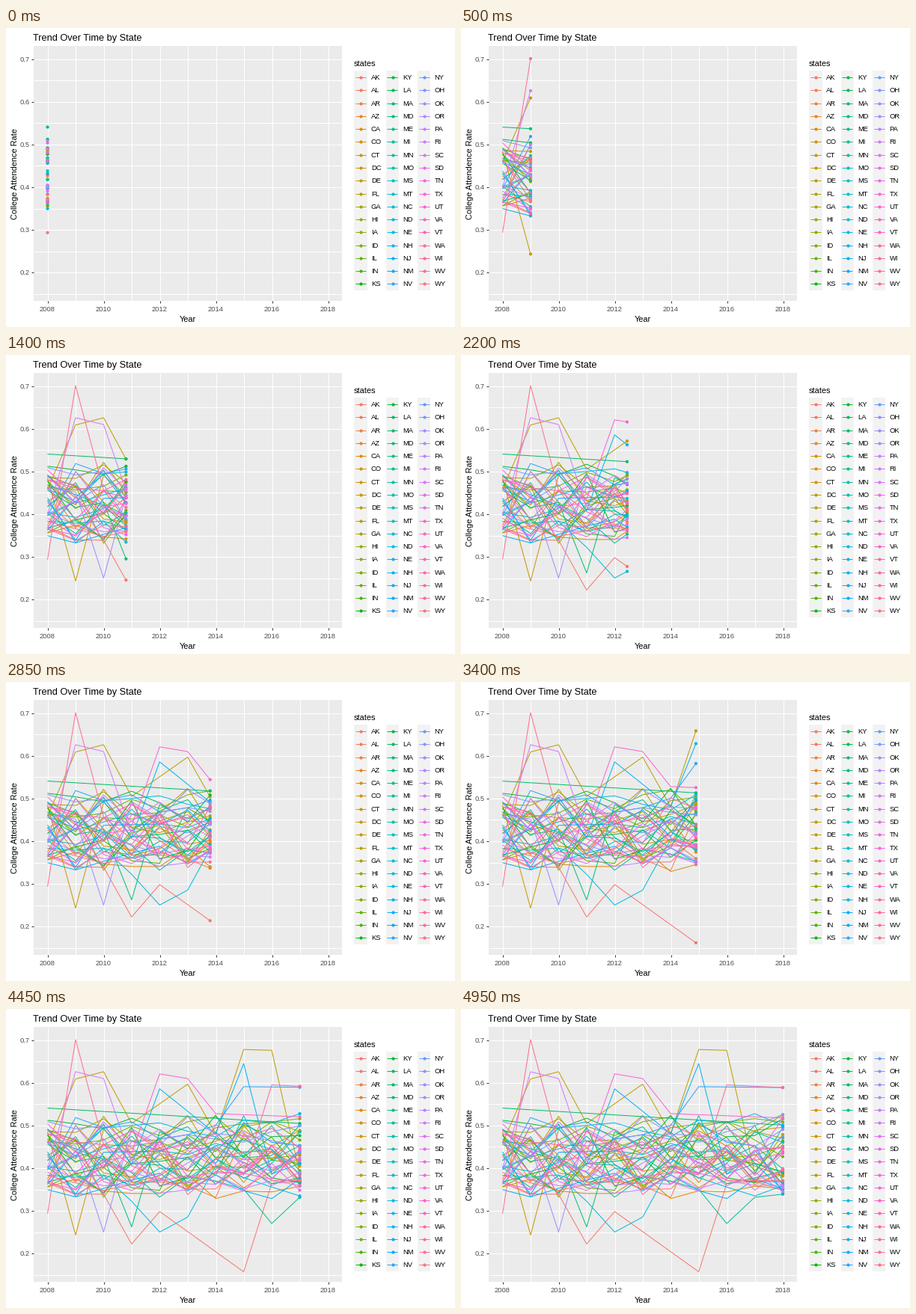
Animation of 600x400 px, one loop 5 s. Source, as a matplotlib script:

```python
import numpy as np
import matplotlib.pyplot as plt
from matplotlib.animation import FuncAnimation
from matplotlib.collections import LineCollection
from matplotlib.patches import Rectangle

plt.rcParams["font.family"] = "Liberation Sans"

W, H = 600, 400
FRAMES, INTERVAL = 100, 50
YEARS = np.arange(11)
# each year falls on a whole frame
KEYS = np.round(1 + (FRAMES - 1) * YEARS / 10) - 1
STATES = (
    "AK AL AR AZ CA CO CT DC DE FL GA HI IA ID IL IN KS "
    "KY LA MA MD ME MI MN MO MS MT NC ND NE NH NJ NM NV "
    "NY OH OK OR PA RI SC SD TN TX UT VA VT WA WI WV WY"
).split()

# (year index, rate) turning points of the states that leave the pack
TURNS = {
    "AK": [(3, 0.222), (4, 0.298), (7, 0.157)],
    "DC": [(1, 0.243)],
    "DE": [(1, 0.608), (2, 0.625), (3, 0.504), (5, 0.596),
           (6, 0.48), (7, 0.677), (8, 0.675)],
    "MA": [(0, 0.54), (10, 0.5)],
    "MD": [(3, 0.262)],
    "MI": [(8, 0.27)],
    "ND": [(3, 0.322), (4, 0.25), (5, 0.285)],
    "NH": [(4, 0.585), (6, 0.48), (7, 0.644)],
    "NV": [(7, 0.59), (10, 0.588)],
    "OK": [(2, 0.25)],
    "RI": [(1, 0.625), (2, 0.609)],
    "UT": [(4, 0.62), (5, 0.609), (6, 0.527), (10, 0.517)],
    "WI": [(8, 0.594), (10, 0.588)],
    "WV": [(0, 0.293), (1, 0.7)],
}


def hcl(hue, chroma=100, lum=65):
    """Polar LUV colour to clipped sRGB."""
    un, vn = 0.19784, 0.46834
    h = np.radians(hue)
    u = chroma * np.cos(h) / (13 * lum) + un
    v = chroma * np.sin(h) / (13 * lum) + vn
    y = ((lum + 16) / 116) ** 3
    x = 9 * y * u / (4 * v)
    z = y * (12 - 3 * u - 20 * v) / (4 * v)
    to_rgb = np.array([[3.2405, -1.5371, -0.4985],
                       [-0.9693, 1.8760, 0.0416],
                       [0.0556, -0.2040, 1.0572]])
    rgb = np.clip(to_rgb @ [x, y, z], 0, 1)
    return np.where(rgb <= 0.0031308, 12.92 * rgb,
                    1.055 * rgb ** (1 / 2.4) - 0.055)


def px(year):
    return 55.5 + 37.45 * year


def py(rate):
    return 41 + (0.7 - rate) * 572


def make_rates():
    """Noisy rates around a level per state, squashed into a band."""
    rng = np.random.default_rng(8)
    level = rng.normal(0, 0.35, (len(STATES), 1))
    noise = rng.normal(0, 0.42, (len(STATES), len(YEARS)))
    rates = 0.427 + 0.11 * np.tanh(level + noise)
    for state, turns in TURNS.items():
        years, values = zip(*turns)
        span = np.arange(years[0], years[-1] + 1)
        rates[STATES.index(state), span] = np.interp(span, years, values)
    return rates


RATES = make_rates()
COLORS = [hcl(15 + 360 * i / len(STATES)) for i in range(len(STATES))]

fig = plt.figure(figsize=(W / 72, H / 72), dpi=72, facecolor="white")
ax = fig.add_axes([0, 0, 1, 1])
ax.set_xlim(0, W)
ax.set_ylim(H, 0)
ax.axis("off")


def box(x0, y0, x1, y1, color):
    ax.add_patch(Rectangle((x0, y0), x1 - x0, y1 - y0, fc=color, lw=0, zorder=0))


def rule(x0, y0, x1, y1, color):
    ax.plot([x0, x1], [y0, y1], color=color, lw=1,
            solid_capstyle="butt", zorder=1)


def label(x, y, text, size, color="black", **kw):
    ax.text(x, y, text, fontsize=size, color=color, va="baseline", **kw)


def dots(x, y, colors):
    return ax.scatter(x, y, s=4.2 ** 2, c=colors, linewidths=0, zorder=4)


def draw_panel():
    box(37, 24, 449, 365, "#EBEBEB")
    for year in YEARS:
        x = int(px(year)) + 0.5
        rule(x, 24, x, 365, "white")
        if year % 2 == 0:
            rule(x, 365, x, 368, "#333333")
            label(x, 379, str(2008 + year), 9.4, "#4D4D4D", ha="center")
    for step in range(3, 15):
        rate = step / 20
        y = int(py(rate)) + 0.5
        rule(37, y, 449, y, "white")
        if step % 2 == 0:
            rule(34, y, 37, y, "#333333")
            label(32, y + 3.5, f"{rate:.1f}", 9.4, "#4D4D4D", ha="right")
    label(36.5, 17, "Trend Over Time by State", 12.8)
    label(243, 393, "Year", 11, ha="center")
    label(15, 195, "College Attendence Rate", 11, ha="center",
          rotation=90, rotation_mode="anchor")


def draw_legend():
    label(465, 51, "states", 11)
    for col in range(3):
        left = 465.3 + 42.3 * col
        box(left, 57, left + 17.3, 351, "#F2F2F2")
        for row in range(17):
            i = col * 17 + row
            y = int(65.5 + 17.28 * row) + 0.5
            rule(left + 1.7, y, left + 15.6, y, COLORS[i])
            dots([int(left + 8.6) + 0.5], [y], [COLORS[i]])
            label(left + 22.7, y + 3.5, STATES[i], 9.4)


draw_panel()
draw_legend()
lines = LineCollection([], colors=COLORS, linewidths=1, zorder=3)
ax.add_collection(lines, autolim=False)
heads = dots(np.full(len(STATES), px(0)), py(RATES[:, 0]), COLORS)


def update(frame):
    now = np.interp(frame, KEYS, YEARS)
    times = np.append(YEARS[YEARS < now], now)
    tracks = [np.column_stack([px(times), py(np.interp(times, YEARS, row))])
              for row in RATES]
    lines.set_segments(tracks if frame else [])
    heads.set_offsets([track[-1] for track in tracks])
    return lines, heads


anim = FuncAnimation(fig, update, frames=FRAMES, interval=INTERVAL,
                     repeat=True, repeat_delay=0)
plt.show()
```
